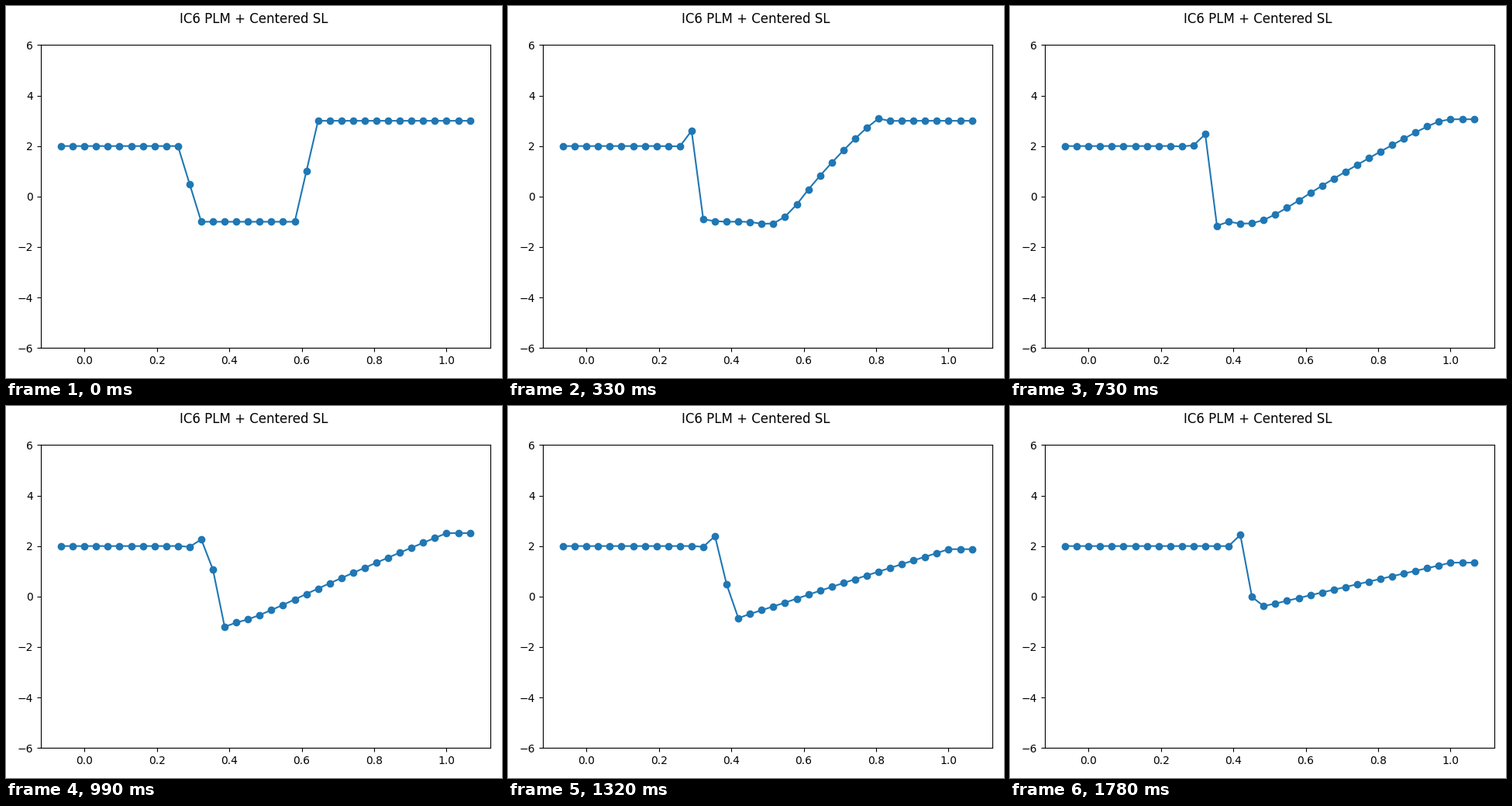
A matplotlib script for the animation above (1850 ms loop, 640x480 px).

```python
import matplotlib.pyplot as plt
import numpy as np
from matplotlib.animation import FuncAnimation

WIDTH, HEIGHT, DPI = 640, 480, 100
LEFT, RIGHT, TOP, BOTTOM = 44.72, 625, 50.4, 441.28   # plot box, px from top left
TITLE_BASE = 21.6

N, GHOST = 32, 2          # interior points, ghost points per side
CFL = 0.9
STATES = 28
TICK, LOOP = 10, 1850     # ms

dx = 1 / (N - 1)
x = dx * np.arange(-GHOST, N + GHOST)


def initial():
    """Two jumps, with the mean value on the point at each jump."""
    u = np.where(x < 0.3, 2.0, np.where(x < 0.6, -1.0, 3.0))
    for edge in (0.3, 0.6):
        i = np.argmin(abs(x - edge))
        u[i] = (u[i - 1] + u[i + 1]) / 2
    return u


def godunov(left, right):
    """Exact Riemann flux for Burgers' equation."""
    return np.maximum(np.maximum(left, 0) ** 2, np.minimum(right, 0) ** 2) / 2


def step(u):
    """One piecewise linear step with centered slopes."""
    c = CFL / abs(u).max()
    slope = np.zeros_like(u)
    slope[1:-1] = (u[2:] - u[:-2]) / 2
    speed = (u[1:] + u[:-1]) / 2
    left = u[:-1] + slope[:-1] * (1 - c * speed) / 2
    right = u[1:] - slope[1:] * (1 + c * speed) / 2
    flux = godunov(left, right)

    new = u.copy()
    new[GHOST:-GHOST] -= c * np.diff(flux)[GHOST - 1:1 - GHOST]
    new[:GHOST] = new[GHOST]
    new[-GHOST:] = new[-GHOST - 1]
    return new


history = [initial()]
while len(history) < STATES:
    history.append(step(history[-1]))

# Each state lasts 66 ms, rounded to whole ticks.
starts = np.round(6.6 * np.arange(STATES))

fig, ax = plt.subplots(figsize=(WIDTH / DPI, HEIGHT / DPI), dpi=DPI)
fig.subplots_adjust(left=LEFT / WIDTH, right=RIGHT / WIDTH,
                    top=1 - TOP / HEIGHT, bottom=1 - BOTTOM / HEIGHT)
fig.suptitle("IC6 PLM + Centered SL", y=1 - TITLE_BASE / HEIGHT, va="baseline")
line, = ax.plot(x, history[0], "o-")
ax.set_ylim(-6, 6)


def update(tick):
    k = np.searchsorted(starts, tick, side="right") - 1
    line.set_ydata(history[k])
    return line,


anim = FuncAnimation(fig, update, frames=LOOP // TICK, interval=TICK,
                     repeat=True, repeat_delay=0)
plt.show()
```
